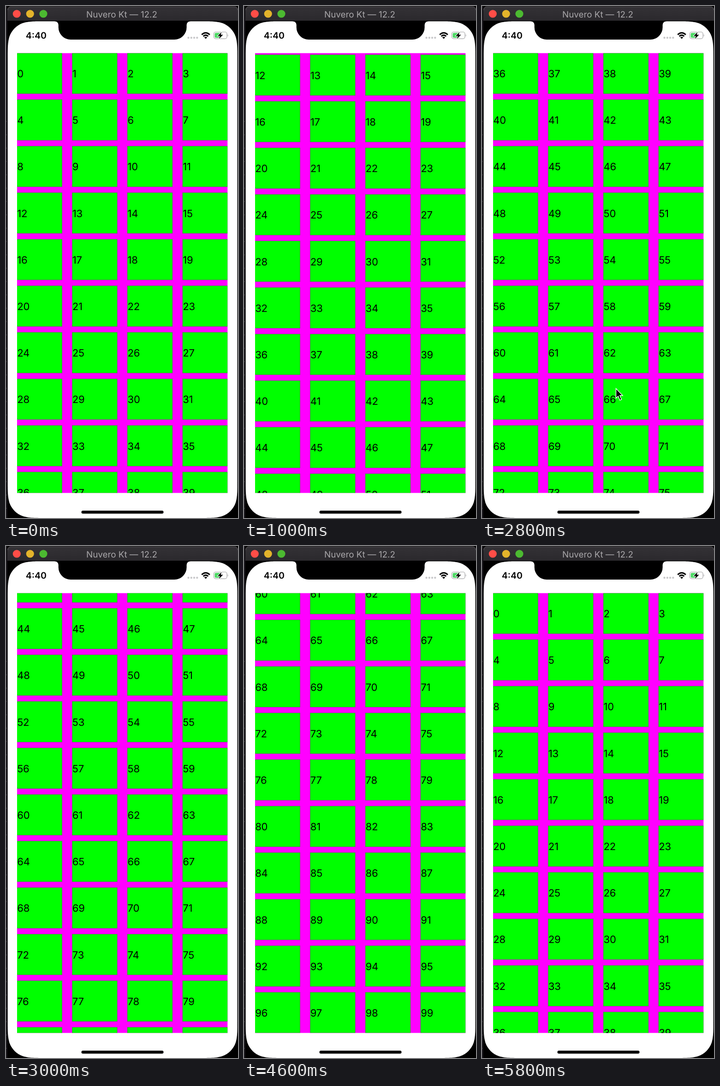
Animation of 503x1113 px, one loop 5.9 s. Source, as an HTML page:

```html
<!DOCTYPE html>
<html lang="en">
<head>
<meta charset="utf-8">
<title>Grid scroll</title>
<style>
  html, body { margin: 0; width: 100%; height: 100%; overflow: hidden; background: #000; }
  svg { display: block; width: 503px; height: 1113px; }
  text { font-family: Inter, Roboto, sans-serif; text-rendering: geometricPrecision; }
  #grid text { font-size: 22px; letter-spacing: -.2px; }
</style>
</head>
<body>
<svg viewBox="0 0 503 1113">
  <defs>
    <linearGradient id="bar" x1="0" y1="0" x2="0" y2="1">
      <stop offset="0" stop-color="#343236"/>
      <stop offset="1" stop-color="#2b292d"/>
    </linearGradient>
    <clipPath id="view"><rect x="24" y="102.4" width="456.3" height="956"/></clipPath>
  </defs>

  <!-- Desktop sliver and window -->
  <rect width="503" height="1113" fill="#000"/>
  <rect width="2.5" height="1113" fill="#1d1b20"/>
  <path d="M.6 250V1110" stroke="#4a484e" stroke-width="1.2" stroke-dasharray="2 27"/>
  <path d="M3 32V9Q3 1 11 1H495Q503 1 503 9V32Z" fill="url(#bar)"/>
  <path d="M4 9Q4 1.5 11 1.5H495Q502 1.5 502.5 9" fill="none" stroke="#59575b"/>
  <circle cx="23.3" cy="17" r="8.6" fill="#ff4d47"/>
  <circle cx="52.2" cy="17" r="8.6" fill="#e3b32b"/>
  <circle cx="81" cy="17" r="8.6" fill="#4cba31"/>
  <text x="251" y="24.5" font-size="18.8" text-anchor="middle" fill="#aaa8ab">Nuvero Kt — 12.2</text>

  <!-- Phone screen with notch -->
  <path id="screen" fill="#fff"/>
  <path d="M105.700 32V33.200A8 8 0 0 1 113.700 41.200V46.400A26.600 26.600 0 0 0 140.300 73H365A26.600 26.600 0 0 0 391.600 46.400V41.200A8 8 0 0 1 399.600 33.200V32Z"/>
  <rect x="163.500" y="1097" width="178" height="6.500" rx="3.250"/>

  <!-- Status bar -->
  <text x="42.700" y="71" font-size="19.600" font-weight="600">4:40</text>
  <g fill="#c9c9cb">
    <circle cx="395.500" cy="69" r="2.200"/><circle cx="401.800" cy="69" r="2.200"/>
    <circle cx="408" cy="69" r="2.200"/><circle cx="414.300" cy="69" r="2.200"/>
  </g>
  <g fill="none" stroke="#000" stroke-width="3">
    <path d="M424.300 62.300Q433 54.300 441.700 62.300"/>
    <path d="M427.700 65.800Q433 61 438.300 65.800"/>
  </g>
  <path d="M429.800 68.200Q433 65.600 436.200 68.200L433 71.500Z"/>
  <rect x="450.500" y="56.500" width="28.500" height="14.600" rx="4" fill="#fff" stroke="#a5a5a7" stroke-width="1.200"/>
  <rect x="452.500" y="58.500" width="14" height="10.600" rx="2.300" fill="#4cd964"/>
  <path d="M480.600 61.200Q483 64 480.600 66.600Z" fill="#a5a5a7"/>
  <path d="M467.500 56.500L458.800 65.200H463.800L461.600 71.400L470.600 62.500H465.500Z" stroke="#fff" stroke-width="1.800" paint-order="stroke"/>

  <g clip-path="url(#view)">
    <rect x="24" y="102" width="457" height="957" fill="#f0f"/>
    <g id="grid"></g>
  </g>
  <path id="cursor" d="M290.500 831.500V852.500L295.200 848.200L299 857L302.600 855.400L298.800 846.800H305Z" stroke="#fff" stroke-width="1.400" visibility="hidden"/>
</svg>
<script>
  const LOOP = 5900, STEP = 100;
  const COL = 119.67, ROW = 101.2, LEFT = 24, TOP = 102.4;
  const PAGE = 9 * ROW, END = 1560.8;

  // [time, scroll offset]
  const KEYS = [
    [0, 0], [700, 0], [800, 20], [900, 110], [1000, 299.8], [1100, 720], [1200, PAGE],
    [2800, PAGE], [2900, 950], [3000, 1080], [3100, 1330], [3200, 1510], [3300, END],
    [4600, END], [4700, 1540], [4800, 1460], [4900, 1330], [5000, 1169.9],
    [5100, 600], [5200, 190], [5300, 50], [5400, 8], [5500, 0], [LOOP, 0]
  ];

  const grid = document.getElementById('grid');
  const cursor = document.getElementById('cursor');

  function add(tag, attrs, text = '') {
    const el = document.createElementNS('http://www.w3.org/2000/svg', tag);
    for (const name in attrs) el.setAttribute(name, attrs[name]);
    el.textContent = text;
    grid.append(el);
  }

  // Rectangle with continuous-curvature corners
  function smoothRect(left, top, right, bottom, r) {
    const bend = [[1.529, 0], [1.088, 0], [0.868, 0], [0.631, 0.075], [0.373, 0.169]];
    const curve = bend.concat(bend.map(([a, b]) => [b, a]).reverse());
    const corner = (x, y, sx, sy, flip) => {
      const pts = curve.map(([a, b]) => `${x + sx * a * r} ${y + sy * b * r}`);
      if (flip) pts.reverse();
      return `${pts[0]}C${pts.slice(1).join(' ')}`;
    };
    return 'M' + [
      corner(left, top, 1, 1, true), corner(right, top, -1, 1, false),
      corner(right, bottom, -1, -1, true), corner(left, bottom, 1, -1, false)
    ].join('L') + 'Z';
  }

  document.getElementById('screen').setAttribute('d', smoothRect(3.7, 33.2, 501.6, 1113, 52));

  for (let i = 0; i < 100; i++) {
    const x = LEFT + (i % 4) * COL;
    const y = TOP + Math.floor(i / 4) * ROW;
    add('rect', {
      x, y, width: 97.3, height: 88, fill: '#0f0',
      stroke: '#555', 'stroke-width': 1.4, 'stroke-opacity': 0.7, 'paint-order': 'stroke'
    });
    add('text', { x: x + 0.2, y: y + 52.6 }, i);
  }

  function scrollAt(t) {
    const i = KEYS.findIndex(key => key[0] > t);
    const [t0, a] = KEYS[i - 1], [t1, b] = KEYS[i];
    return a + (b - a) * (t - t0) / (t1 - t0);
  }

  function draw(now) {
    const t = Math.floor((now % LOOP) / STEP) * STEP;
    grid.setAttribute('transform', `translate(0 ${-scrollAt(t)})`);
    cursor.setAttribute('visibility', t === 2800 ? 'visible' : 'hidden');
  }

  const start = performance.now();
  function tick() {
    draw(performance.now() - start);
    requestAnimationFrame(tick);
  }
  tick();
</script>
</body>
</html>
```
